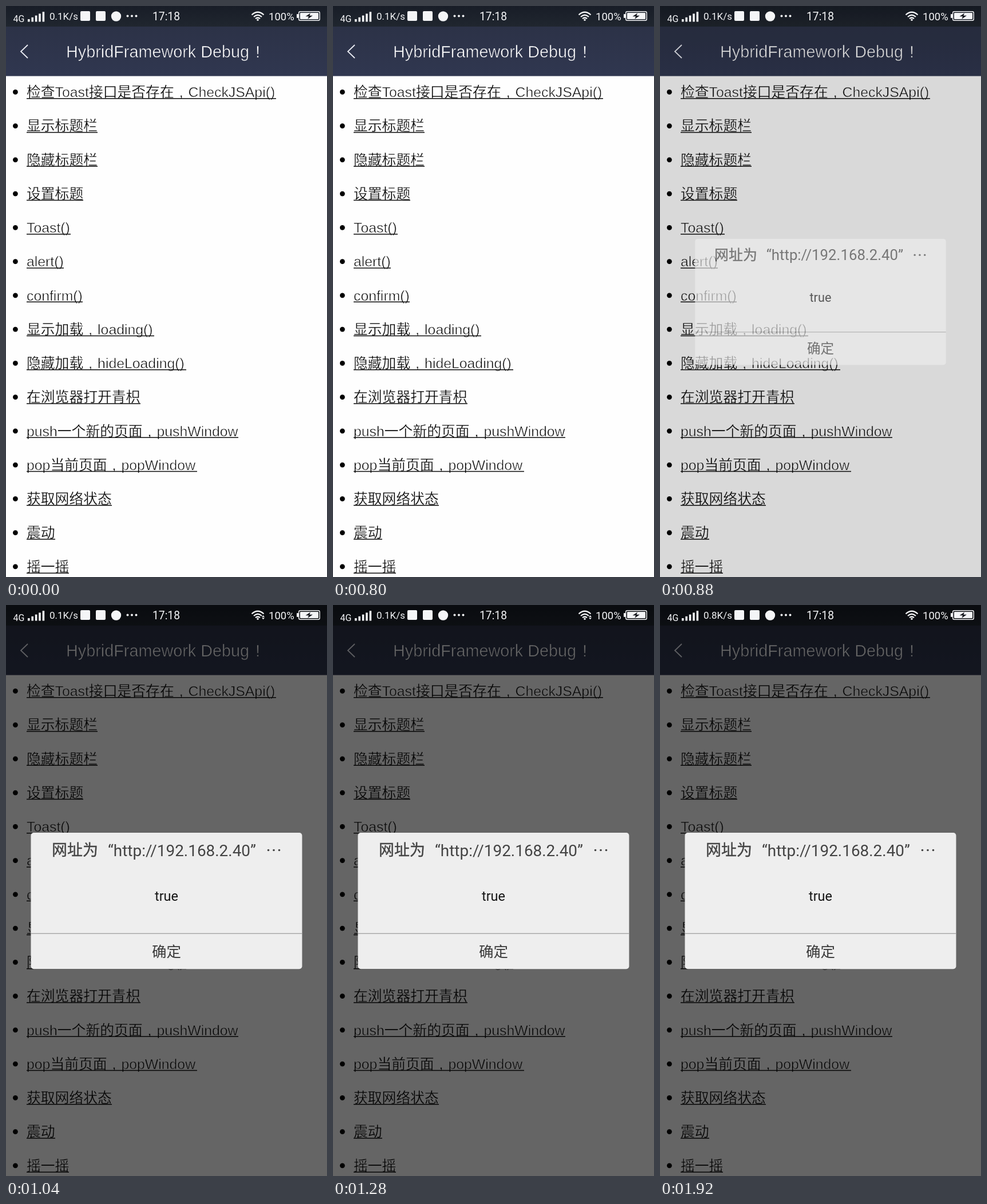
Recreate the animation shown at these times as an HTML page. Size 561 by 998 pixels, loop 2000 ms.

```html
<!DOCTYPE html>
<html lang="zh-CN">
<head>
<meta charset="utf-8">
<title>Debug</title>
<style>
  html, body { margin: 0; width: 100%; height: 100%; overflow: hidden; background: #fff; }
  svg { display: block; width: 100vw; height: 100vh; }
  /* A thin background-coloured stroke makes the glyphs lighter. */
  .light { font-family: "Liberation Sans", "Noto Sans CJK SC", "Noto Sans CJK", sans-serif; font-weight: 300; stroke-width: .3; }
  .thin { stroke-width: .65; }
  .ui { font-family: Roboto, "Noto Sans CJK SC", "Noto Sans CJK", sans-serif; }
</style>
</head>
<body>
<svg viewBox="0 0 561 998" preserveAspectRatio="none">
  <defs>
    <linearGradient id="statusFill" x1="0" y1="0" x2="0" y2="1">
      <stop offset="0" stop-color="#181d27"/><stop offset="1" stop-color="#20262f"/>
    </linearGradient>
    <linearGradient id="headFill" x1="0" y1="0" x2="0" y2="1">
      <stop offset="0" stop-color="#2c3247"/><stop offset="1" stop-color="#303750"/>
    </linearGradient>
  </defs>

  <rect width="561" height="998" fill="#fefefe"/>
  <g id="list"></g>

  <rect width="561" height="36" fill="url(#statusFill)"/>
  <rect y="36" width="561" height="86.5" fill="url(#headFill)"/>
  <path d="M38 68 26 79.5 38 91" fill="none" stroke="#eceef5" stroke-width="1.8"/>
  <g class="light" font-size="28.8" fill="#fff" stroke="#2e344b">
    <text class="thin" x="105" y="89.5">HybridFramework Debug</text>
    <text class="thin" x="436" y="89.5">!</text>
  </g>

  <rect id="dim" width="561" height="998" fill="#000" opacity="0"/>

  <g class="ui" fill="#f4f5f7">
    <text x="12.5" y="27.5" font-size="16">4G</text>
    <g id="signal"></g>
    <text id="speed" x="76" y="24" font-size="17">0.1K/s</text>
    <rect x="130" y="9" width="17" height="17" rx="2"/>
    <rect x="157" y="9" width="17" height="17" rx="2"/>
    <circle cx="192.5" cy="18" r="8.7"/>
    <g id="more"></g>
    <text x="256" y="25" font-size="19.3">17:18</text>
    <path d="M429.5 15.5Q440 6 450.5 15.5M433 19Q440 12.5 447 19M436 22.2Q440 18.8 444 22.2" fill="none" stroke="#f4f5f7" stroke-width="2.2"/>
    <circle cx="440" cy="24.3" r="1.7"/>
    <path id="traffic" d="M447 21 449.5 18 452 21ZM447 22.2H452L449.5 25.2Z"/>
    <text x="459" y="24.5" font-size="18.5">100%</text>
    <rect x="508" y="14" width="3" height="7" rx="1"/>
    <rect x="511.7" y="9.7" width="36.6" height="15.6" rx="2.5" fill="none" stroke="#f4f5f7" stroke-width="1.4"/>
    <rect x="514" y="12" width="32" height="11" rx="1"/>
    <path d="M532 12.5 523.5 18.2H529L527.5 22.8 536 16.8H530.5Z" fill="#15181f"/>
  </g>

  <g id="dialog" class="ui" display="none">
    <rect x="43.5" y="398" width="474" height="238.3" rx="5" fill="#eee"/>
    <rect x="43.5" y="573.6" width="474" height="1.2" fill="#999"/>
    <g fill="#444">
      <text x="80" y="438" font-size="27" font-weight="500" stroke="#444" stroke-width=".4">网址为</text>
      <text x="178" y="438.5" font-size="27.9">“http://192.168.2.40”</text>
      <g id="ellipsis"></g>
    </g>
    <text x="280.5" y="517" font-size="23.5" fill="#151515" text-anchor="middle">true</text>
    <text x="280.5" y="614.5" font-size="25.5" fill="#3a3a3a" text-anchor="middle">确定</text>
  </g>
</svg>

<script>
const LOOP = 2000, STEP = 80;
const $ = id => document.getElementById(id);

// Label and right end of its underline.
const rows = [
  ["检查Toast接口是否存在，CheckJSApi()", 472],
  ["显示标题栏", 160],
  ["隐藏标题栏", 160],
  ["设置标题", 135],
  ["Toast()", 113],
  ["alert()", 101],
  ["confirm()", 134],
  ["显示加载，loading()", 259],
  ["隐藏加载，hideLoading()", 315],
  ["在浏览器打开青枳", 235],
  ["push一个新的页面，pushWindow", 406],
  ["pop当前页面，popWindow", 334],
  ["获取网络状态", 185],
  ["震动", 86],
  ["摇一摇", 110]
];

// Latin runs are thinner; a comma is centred in its full-width cell.
const markup = s => s
  .replace(/[ -~]+/g, '<tspan class="thin">$&</tspan>')
  .replace(/，(.*)/, '<tspan dx="9">,</tspan><tspan dx="9">$1</tspan>');

$("list").innerHTML = rows.map(([label, end], i) => {
  const y = 150 + i * 59.25;
  return `<circle cx="16.4" cy="${y + .3}" r="4.4"/>
    <text class="light" x="36" y="${y + 9.2}" font-size="24.8" fill="#080808" stroke="#fefefe">${markup(label)}</text>
    <rect x="36" y="${y + 11}" width="${end - 36}" height="1.5" fill="#0c0c0c"/>`;
}).join("");

const dots = (x, y, gap, r) =>
  [0, 1, 2].map(i => `<circle cx="${x + i * gap}" cy="${y}" r="${r}"/>`).join("");
$("more").innerHTML = dots(212.5, 17.5, 7.5, 2);
$("ellipsis").innerHTML = dots(458.5, 428.5, 9.5, 1.8);

$("signal").innerHTML = [0, 1, 2, 3, 4].map(i => {
  const h = 4.5 + i * 3.2;
  return `<rect x="${38 + i * 6.4}" y="${27.5 - h}" width="3.6" height="${h}"/>`;
}).join("");

const dimLevels = [0, .145, .43, .6];

function draw(ms) {
  const t = Math.floor((ms % LOOP) / STEP) * STEP;
  const phase = Math.max(0, Math.min(3, (t - 800) / STEP));
  $("dim").setAttribute("opacity", dimLevels[phase]);

  const opening = phase === 1;
  const dialog = $("dialog");
  dialog.setAttribute("display", phase ? "inline" : "none");
  dialog.setAttribute("opacity", opening ? .65 : 1);
  dialog.setAttribute("transform",
    `translate(280.5 517) scale(${opening ? .925 : 1}) translate(-280.5 -517)`);

  $("speed").textContent = t < 1360 ? "0.1K/s" : "0.8K/s";
  $("traffic").setAttribute("display", t >= 960 && t < 1920 ? "inline" : "none");
}

const start = performance.now();
function tick() {
  draw(performance.now() - start);
  requestAnimationFrame(tick);
}
tick();
</script>
</body>
</html>
```
